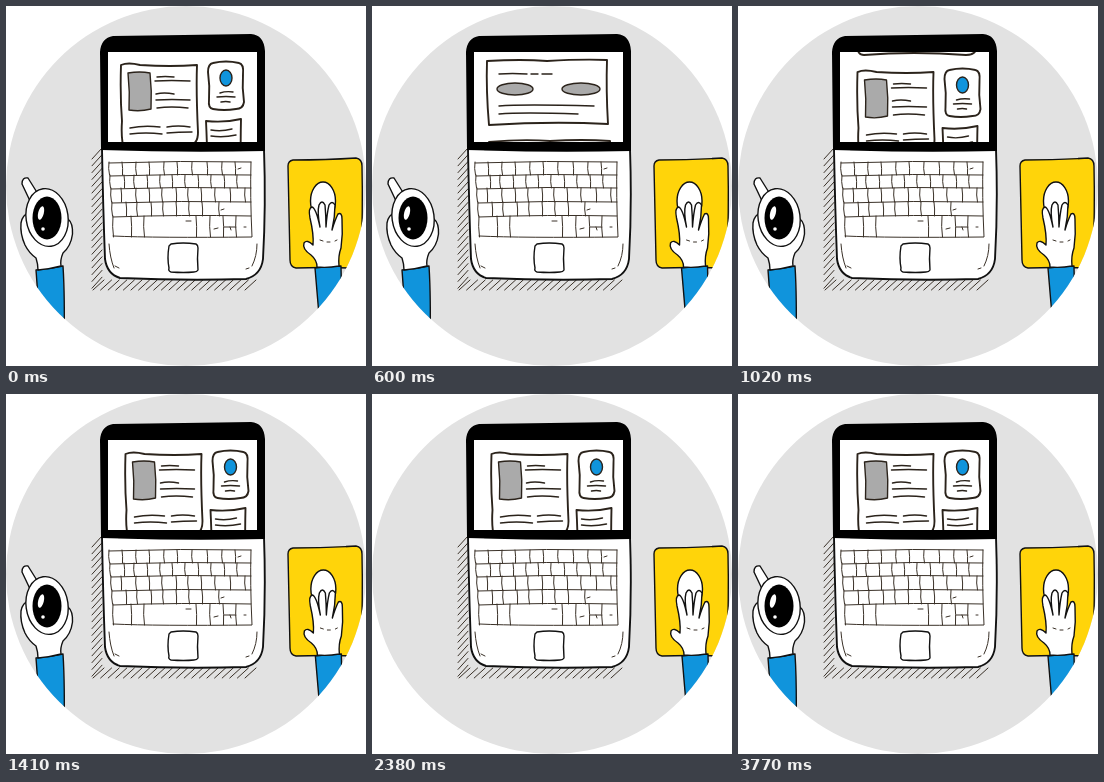
Animation of 360 by 360 pixels, one loop 4.77 s. Source, as an HTML page:

```html
<!DOCTYPE html>
<html lang="en">
<head>
<meta charset="utf-8">
<title>Desk</title>
<style>
html, body { margin: 0; height: 100%; overflow: hidden; background: #fff; }
svg { display: block; width: 100vw; height: 100vh; }
.ink { fill: none; stroke: #111; stroke-width: 1.4; stroke-linecap: round; stroke-linejoin: round; }
.white { fill: #fff; }
.blue { fill: #1094dc; }
.page { stroke: #2b231b; }
.thin { stroke: #3a3128; stroke-width: 1; }
.bold { stroke-width: 1.9; }
</style>
</head>
<body>
<svg viewBox="0 0 360 360">
  <defs>
    <clipPath id="disc"><circle cx="180" cy="180" r="180"/></clipPath>
    <clipPath id="screen"><path d="M102 46H251V136H102Z"/></clipPath>
    <g id="page" class="ink page">
      <!-- article, profile and side note -->
      <path class="bold" d="M115 59Q122 56 134 59Q165 61 191 59Q190 85 192 126Q192 137 186 138Q150 141 117 139Q115 130 116 115Q114 90 115 59Z"/>
      <path fill="#aaa" d="M122 67Q134 65 144 67Q146 85 145 103Q134 106 123 104Q124 86 122 67Z"/>
      <path d="M151 71Q159 70 168 71M149 75Q165 74 184 75M150 88Q158 86 168 88M150 94Q165 93 184 94M151 102Q165 100 182 102M124 122Q138 119 154 121M161 121Q172 119 184 121M124 128Q140 126 156 128M161 127Q172 126 186 126"/>
      <path class="bold" d="M207 57Q220 54 233 57Q238 58 237 68Q236 82 238 96Q237 103 230 103Q218 105 207 103Q202 102 203 94Q204 80 202 66Q202 58 207 57Z"/>
      <ellipse class="blue" cx="220" cy="72" rx="6" ry="8"/>
      <path d="M214 87Q220 85 227 86M211 91Q220 90 229 91M215 96Q220 95 224 96"/>
      <path class="bold" d="M200 115Q218 117 235 113Q234 155 236 197Q218 200 201 198Q202 156 200 115Z"/>
      <path d="M205 124Q215 126 226 123M205 130Q217 132 230 129M206 150Q217 152 229 149M206 165Q217 166 229 165"/>
      <!-- three columns -->
      <path class="bold" d="M115 211Q140 213 175 211Q210 213 235 211Q234 230 236 246Q200 244 170 246Q140 244 116 246Q117 230 115 211Z"/>
      <path d="M122 221Q132 219 143 222M124 229Q128 227 133 229M164 220Q175 219 188 222M164 228Q170 226 176 228M201 224Q210 222 220 225M201 231Q207 229 213 232"/>
      <!-- buttons -->
      <path class="bold" d="M115 261Q150 259 175 261Q210 259 235 260Q234 290 236 324Q180 321 117 325Q114 290 115 261Z"/>
      <path d="M127 274Q140 273 155 274M159 274H166M170 274H180"/>
      <ellipse fill="#aaa" cx="143" cy="289" rx="18" ry="6"/>
      <ellipse fill="#aaa" cx="209" cy="289" rx="19" ry="6"/>
      <path d="M127 306Q150 304 222 306M127 314Q150 312 206 314"/>
      <!-- closing card -->
      <path class="bold" d="M117 342Q150 339 178 341Q210 339 238 341Q241 390 238 438Q236 443 228 443Q175 439 126 443Q119 443 120 434Q116 400 117 342Z"/>
      <path d="M128 351H216M129 367Q140 366 152 367M157 367Q172 366 192 368M127 387Q148 385 169 387M186 387Q205 385 234 387M130 394Q140 393 151 394M157 394Q180 391 207 393M213 393H232M133 430Q139 429 145 430M130 434Q140 433 150 434M171 428Q176 427 183 428M168 433Q176 432 186 433M206 430Q211 429 216 430M203 434Q211 433 220 434"/>
      <g fill="#fcc80d">
        <path id="fruit" d="M140 402Q147 406 147 414Q146 422 139 422Q132 421 132 413Q134 405 140 402Z"/>
        <use href="#fruit" x="36" y="1"/>
        <use href="#fruit" x="70" y="1"/>
      </g>
    </g>
  </defs>

  <g clip-path="url(#disc)">
    <path fill="#e2e2e2" d="M0 0H360V360H0Z"/>
    <path id="hatch" class="ink thin"/>

    <!-- laptop -->
    <path class="ink white bold" d="M96 143Q97 200 99 253Q101 268 114 272Q180 275 240 273Q255 269 257 253Q260 200 258 143Z"/>
    <path d="M95 144L94 46Q95 32 107 30Q180 29 245 28Q258 29 259 45V145Q180 147 95 144Z"/>
    <path fill="#fff" d="M102 46H251V136H102Z"/>
    <g clip-path="url(#screen)">
      <g id="scroll">
        <use href="#page"/>
        <use href="#page" x="4.5" y="401"/>
      </g>
    </g>
    <path id="keys" class="ink thin"/>
    <path class="ink thin" d="M232 163L235 162M215 204L218 203M180 215L185 215M208 223L212 222M224 221L225 224M238 221L240 221M103 238Q104 252 108 262M109 260L113 262M251 238Q251 250 246 260M240 263L243 262"/>
    <path class="ink" d="M165 238Q177 236 190 238Q192 239 192 242Q191 252 192 264Q191 266 188 266Q178 267 165 266Q162 265 163 262Q161 252 163 240Z"/>

    <!-- mat and mouse hand -->
    <path class="ink" style="fill:#ffd40a" d="M287 154Q320 154 350 152Q356 153 356 160Q357 205 355 256Q354 262 346 262Q315 261 290 262Q284 261 284 254Q283 210 282 160Q282 155 287 154Z"/>
    <g id="hand">
      <ellipse class="ink white" cx="318" cy="195" rx="12.500" ry="19"/>
      <path class="ink blue" d="M310 262Q323 260 336 260Q337 290 333 340H317Q313 300 310 262Z"/>
      <path class="ink white" d="M312 261Q312 254 306 249Q297 243 299 237Q302 233 308 239Q309 229 305 212Q303 202 307 201Q311 202 315 221Q312 206 314 199Q317 193 320 199Q321 210 321 221Q322 207 324 199Q327 194 330 199Q330 211 327 224Q330 214 333 208Q337 206 337 213Q338 228 336 242Q333 250 334 260Q323 262 312 261Z"/>
      <path class="ink thin" d="M315 234L318 235M322 236L325 236M330 235L332 234"/>
    </g>

    <!-- coffee hand -->
    <g id="coffee">
      <path class="ink blue" d="M30 264Q43 263 57 260Q59 290 58 345H34Q33 300 30 264Z"/>
      <path class="ink white" d="M22 208Q17 208 15 217Q14 228 19 239Q23 247 30 252Q32 258 32 264Q44 263 55 260Q54 254 57 247Q65 240 66.500 228Q67 217 62 213Z"/>
      <path class="ink white" d="M25 197L16 178Q16 171 22 172L32 188Z"/>
      <ellipse class="ink white" cx="41" cy="211.500" rx="21" ry="29" transform="rotate(-8 41 211)"/>
      <ellipse cx="41" cy="212" rx="14.500" ry="21.500"/>
      <ellipse fill="#fff" cx="35" cy="207" rx="2.800" ry="7" transform="rotate(14 35 207)"/>
      <circle fill="#fff" cx="37" cy="223" r="1.800"/>
    </g>
  </g>
</svg>
<script>
const LOOP = 4770, STEP = 30, PAGE = 400;
const el = id => document.getElementById(id);

// Shadow strokes along the left and lower sides
let hatch = '';
for (let y = 142; y < 272; y += 6.8) hatch += `M86 ${y + 11}L96 ${y}`;
for (let x = 87; x < 243; x += 7.6) hatch += `M${x} 284L${x + 11} 274`;
el('hatch').setAttribute('d', hatch);

// Key rows: top, bottom, left edge, then the dividers
const rows = [
  [156, 169, 103, 116, 130, 143, 158, 171, 186, 201, 216, 229],
  [169, 182, 104, 118, 128, 141, 154, 166, 179, 192, 205, 218, 231],
  [182, 196, 105, 115, 130, 143, 156, 170, 182, 195, 209, 224, 239],
  [196, 210, 106, 120, 131, 145, 157, 170, 183, 196, 213],
  [210, 231, 107, 125, 138, 190, 204, 217, 230]
];
let keys = '';
for (const [top, low, ...xs] of rows) {
  keys += `M${xs[0]} ${top + 1}Q175 ${top - 1.5} 245 ${top}`;
  xs.forEach((x, i) => keys += `M${x} ${top}Q${x + (i % 2 ? 1 : -1)} ${(top + low) / 2} ${x + .5} ${low}`);
}
keys += 'M107 230Q150 232 246 231Q244 190 245 156M218 221H230';
el('keys').setAttribute('d', keys);

const ease = u => (1 - Math.cos(Math.PI * u)) / 2;
// Share of n steps done, the first one falling at `start`
const prog = (t, start, n) => Math.min(n, Math.max(0, Math.floor((t - start) / STEP) + 1)) / n;
const pulse = u => Math.sin(Math.PI * u) ** 2;

function move(id, x, y) {
  el(id).setAttribute('transform', `translate(${x.toFixed(2)} ${y.toFixed(2)})`);
}

function draw(t) {
  const done = (ease(prog(t, 30, 18)) + ease(prog(t, 570, 18))) / 2;
  move('scroll', 0, -PAGE * done);

  const push1 = pulse(prog(t, 30, 12)), push2 = pulse(prog(t, 660, 12));
  const sway = Math.sin(2 * Math.PI * ease(prog(t, 1410, 13)));
  move('hand', done - 1 + 2 * push1 - (sway > 0 ? 7 : 4) * sway, -9 * (push1 + push2));

  const away = ease(prog(t, 2200, 7)) - ease(prog(t, 3590, 7));
  move('coffee', 0, 155 * away);
}

const begin = performance.now();
function tick() {
  draw((performance.now() - begin) % LOOP);
  requestAnimationFrame(tick);
}
tick();
</script>
</body>
</html>
```
